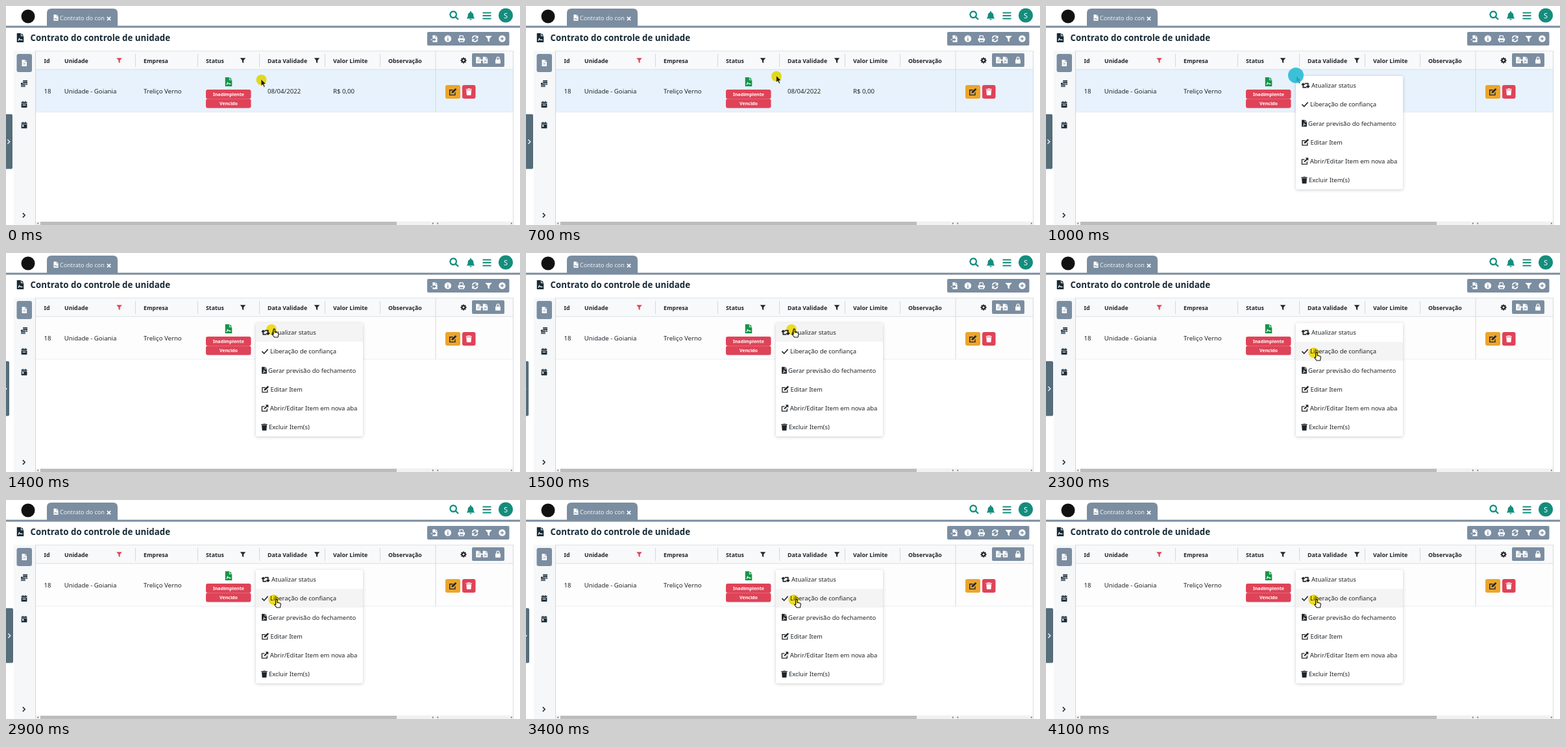
Animation, 792 px wide and 338 px high, one loop 4.2 s. Source, as an HTML page:

```html
<!DOCTYPE html>
<html lang="pt">
<head>
<meta charset="utf-8">
<style>
html, body { margin: 0; width: 100%; height: 100%; overflow: hidden; background: #fff; }
svg { display: block; }
text { font-family: "Noto Sans", "Open Sans", sans-serif; }
#menu { filter: drop-shadow(0 1px 2.5px #0003); }
#halo { mix-blend-mode: multiply; }
</style>
</head>
<body>
<svg id="stage" width="792" height="338" viewBox="0 0 792 338"></svg>
<script>
const SLATE = '#7b8da0', INK = '#202529', NAVY = '#172a36', TEAL = '#148d7d', RED = '#df4358';

// Icons on a 16 unit grid; a leading "~" means stroked
const FILE = 'M2 0h7v5h5v11H2zM10 0l4 4h-4z';
const ICONS = {
  file: FILE + 'M5 8h6v1H5zM5 11h6v1H5z',
  sign: FILE + 'M4 13l2-5 2 3 1-1 1 1h2v1.5H8.5l-1-1.5-1 .5-1 2z',
  pdf: FILE + 'M4 14l3-4-1-3h1.5l1 3 3.5 1v1l-4-.5-2.5 2.5z',
  load: 'M4 0h6v5h5v11H4v-4h4v2l4-4-4-4v2H4zM11 0l4 4h-4zM0 9h3v2H0z',
  info: 'M8 0a8 8 0 1 0 .01 0zM7 3h2v2H7zM6.5 7H9v4h1v1.5H6V11h1V8.5h-.5z',
  print: 'M3 0h8l2 2v4h-2V2H5v4H3zM0 7h16v6h-2v3H2v-3H0zM4 11v3h8v-3z',
  sync: '~M2 7a6 6 0 0 1 11-3M14 1v5H9M14 9a6 6 0 0 1-11 3M2 15v-5h5',
  filter: 'M0 1h16l-6 7v8l-4-3V8z',
  plus: 'M8 0a8 8 0 1 0 .01 0zM7 4h2v3h3v2H9v3H7V9H4V7h3z',
  coins: 'M5 0h11v3H5zM5 4h11v3H5zM0 6h4v2h7v2H0zM0 11h11v2H0zM0 14h11v2H0zM12 8h4v3h-4z',
  cal: 'M1 2h3V0h2v2h4V0h2v2h3v3H1zM1 6h14v10H1zM4 9v2h8V9z',
  calDay: 'M1 2h3V0h2v2h4V0h2v2h3v3H1zM1 6h14v10H1zM3 8v4h4V8z',
  edit: 'M0 3h9L7 5H2v9h10v-4l2-2v8H0zM14 0l2.5 2.5-8 8L5 11l.5-3.5z',
  trash: 'M1 1h4l1-1h4l1 1h4v2H1zM2 4h12l-1 12H3z',
  check: '~M1 8l5 5 9-10',
  swap: '~M3 4v8h7M0 7l3-3 3 3M13 12V4H6M10 9l3 3 3-3',
  open: 'M0 3h8L6 5H2v9h10v-4l2-2v8H0zM9 0h7v7l-2.5-2.5-6 6-2-2 6-6z',
  lock: 'M2 7h2V4a4 4 0 0 1 8 0v3h2v9H2zM6 7h4V4a2 2 0 0 0-4 0z',
  search: '~M6.5 1a5.5 5.5 0 1 0 .01 0zM10.5 10.5l5 5',
  bell: 'M7 0h2v2q4 1 4 6 0 3 2 5H1q2-2 2-5 0-5 4-6zM6 14h4q-2 3.5-4 0z',
  bars: '~M0 2.5h16M0 8h16M0 13.5h16',
  next: '~M5 2l6 6-6 6',
  close: '~M2 2l12 12M14 2L2 14',
  gear: 'M7 0h2l.5 2 1.5.7 2-1 1.3 1.3-1 2 .7 1.5 2 .5v2l-2 .5-.7 1.5 1 2-1.3 1.3-2-1-1.5.7-.5 2H7l-.5-2-1.5-.7-2 1L1.7 13l1-2L2 9.5 0 9V7l2-.5L2.7 5l-1-2L3 1.7l2 1L6.5 2zM8 5.5a2.5 2.5 0 1 0 .01 0z'
};

const icon = (name, cx, cy, size, color, weight = 2.4) => {
  const d = ICONS[name], k = size / 16;
  const paint = d[0] === '~'
    ? `fill="none" stroke="${color}" stroke-width="${weight}"`
    : `fill="${color}" fill-rule="evenodd"`;
  return `<path transform="translate(${cx - size / 2} ${cy - size / 2}) scale(${k})" d="${d.replace('~', '')}" ${paint}/>`;
};
const rect = (x, y, w, h, fill, r = 0) =>
  `<rect x="${x}" y="${y}" width="${w}" height="${h}" rx="${r}" fill="${fill}"/>`;
const label = (s, x, y, size, fill = INK, weight = 400, anchor = 'start') =>
  `<text x="${x}" y="${y}" font-size="${size}" fill="${fill}" font-weight="${weight}" text-anchor="${anchor}">${s}</text>`;

function topBar() {
  return rect(0, 30.5, 792, 3, SLATE) +
    '<circle cx="34" cy="16" r="10.5" fill="#111"/>' +
    `<path d="M63 32V11q0-7 7-7h95q7 0 7 7v21z" fill="${SLATE}"/>` +
    icon('sign', 77, 18, 9.5, '#fff') +
    `<svg x="83" y="8" width="69" height="20">${label('Contrato do controle', 0, 13.7, 9.1, '#eef1f4')}</svg>` +
    icon('close', 158.5, 19.5, 7, '#fff', 4) +
    icon('search', 690.5, 14.5, 14, TEAL, 2.6) + icon('bell', 716, 15, 14, TEAL) +
    icon('bars', 741, 15, 13, TEAL, 2.6) +
    `<circle cx="770" cy="14.5" r="11" fill="${TEAL}"/>` + label('S', 770, 18.5, 11, '#fff', 400, 'middle');
}

function titleBar() {
  const tools = ['load', 'info', 'print', 'sync', 'filter', 'plus'];
  return icon('sign', 22, 49, 14, NAVY) +
    label('Contrato do controle de unidade', 37.5, 53.7, 13.3, NAVY, 600) +
    rect(649, 40, 126.5, 21, SLATE, 2) +
    tools.map((n, i) => icon(n, 660 + i * 20.9, 50.5, 10.5, '#fff')).join('');
}

function sideBar() {
  return rect(12, 69, 33, 269, '#f6f7f9') + rect(45, 69, 1, 269, '#d3d6d9') +
    rect(16.5, 74, 23.5, 28, SLATE, 3) + icon('file', 28.3, 88, 10, '#fff') +
    ['coins', 'cal', 'calDay'].map((n, i) => icon(n, 28, 119.7 + i * 32, 10, NAVY)).join('') +
    icon('next', 27.5, 323, 9, INK, 2.6);
}

function table() {
  const heads = [['Id', 58.5], ['Unidade', 90], ['Empresa', 212], ['Status', 308],
    ['Data Validade', 403], ['Valor Limite', 504], ['Observação', 589]];
  const cells = [['18', 58.5], ['Unidade - Goiania', 89.7], ['Treliço Verno', 212], ['08/04/2022', 403], ['R$ 0,00', 504]];
  const badge = (s, y) => rect(308, y, 69.5, 14.2, RED, 3) + label(s, 343, y + 9.9, 7.1, '#fff', 700, 'middle');
  return rect(46, 69, 735, 29, '#f8f9fa') + rect(46, 69, 735, .8, '#d9dcdf') +
    '<rect id="row" x="46" y="98" width="735" height="66"/>' +
    rect(46, 97.5, 735, 1, '#dcdfe3') + rect(46, 163.5, 735, .8, '#e6e9ec') +
    [199, 295, 390, 491, 576].map(x => rect(x, 74, 1, 20, '#d5d8db')).join('') +
    rect(661.5, 69, 1, 95, '#d5d9de') + rect(781, 69, 1, 269, '#d9dcdf') +
    heads.map(([s, x]) => label(s, x, 87.5, 8.8, INK, 700)).join('') +
    icon('filter', 174.5, 84, 8.5, RED) + icon('filter', 365, 84, 8.5, INK) + icon('filter', 479, 84, 8.5, INK) +
    icon('gear', 705, 84, 9.5, INK) + rect(718, 73, 50, 21, SLATE, 2) +
    icon('file', 728, 83.5, 10, '#fff') + icon('pdf', 738.5, 83.5, 10, '#fff') +
    rect(731, 82.7, 5, 1.6, '#fff') + icon('lock', 758, 83.5, 10.5, '#fff') +
    cells.map(([s, x]) => label(s, x, 135.3, 9.62)).join('') +
    icon('sign', 343, 117, 14, '#169447') + badge('Inadimplente', 129) + badge('Vencido', 143.3) +
    rect(677, 122, 23, 21, '#eba52d', 3) + icon('edit', 688.5, 132.5, 11, INK) +
    rect(703, 122, 20.5, 21, RED, 3) + icon('trash', 713.2, 132.5, 10.5, '#fff') +
    rect(46, 332.5, 735, 5.5, '#f1f1f1') + rect(53, 333, 549, 5, '#bcbcbc') +
    '<path d="M50 334v3l-2-1.5zM657 334v3l2-1.5zM666 334v3l-2-1.5zM778 334v3l2-1.5z" fill="#666"/>';
}

function contextMenu() {
  const items = [['swap', 'Atualizar status', 409, 400, 12], ['check', 'Liberação de confiança', 407, 399, 10.5],
    ['pdf', 'Gerar previsão do fechamento', 404, 398, 10.5], ['edit', 'Editar Item', 407.5, 399.5, 10.5],
    ['open', 'Abrir/Editar Item em nova aba', 406.7, 399, 10.5], ['trash', 'Excluir Item(s)', 405, 398, 10.5]];
  return `<g id="menu">${rect(385, 108, 165, 175, '#fff', 3)}</g><g id="items">` +
    '<rect id="hover" x="385" width="165" height="29" fill="#f4f4f4"/>' +
    items.map(([n, s, x, cx, size], i) => {
      const y = 122.7 + i * 29.2;
      return icon(n, cx, y, size, INK, 2.4) + label(s, x, y + 3.4, 9.48);
    }).join('') + '</g>';
}

const POINTER = `<g id="pointer">
  <path id="arrow" d="M0 0v10.5l2.5-2.2 1.9 4.1 1.9-.9-1.8-3.9h3.4z" fill="#222" stroke="#fff" stroke-width=".7"/>
  <path id="hand" d="M2 7V1q1.2-1.8 2.4 0v4l4.4 1.3q1.4.6 1.1 2.2l-1 4.5H3.6L.4 9q-.5-1.5 1.6-.6z" fill="#fff" stroke="#111" stroke-width="1.1"/>
  </g><circle id="halo" r="8" fill="#f8e420"/>
  <circle id="click" cx="385" cy="107" r="12" fill="#24b8d3" opacity=".88"/>`;

const DRAWER = `<g id="drawer">${rect(-14, 167, 14, 84.5, '#566d7a', 2)}${icon('next', -6, 209.5, 9, '#fff', 2.4)}</g>`;

document.getElementById('stage').innerHTML =
  topBar() + titleBar() + sideBar() + table() + contextMenu() + POINTER + DRAWER;

const $ = Object.fromEntries(['row', 'menu', 'items', 'hover', 'pointer', 'halo', 'arrow', 'hand', 'click', 'drawer']
  .map(id => [id, document.getElementById(id)]));
const show = (el, on) => el.setAttribute('display', on ? 'inline' : 'none');
const move = (el, x, y) => el.setAttribute('transform', `translate(${x} ${y})`);

const LOOP = 4200, STEP = 100;
const PATH = [[0, 393, 113], [100, 393, 113], [500, 385.5, 107.5], [1100, 385.5, 107.5],
  [1400, 410, 117], [1800, 410, 117], [2200, 413.5, 153]];

function pointerAt(t) {
  const i = PATH.findIndex(p => p[0] > t);
  if (i < 0) return PATH[PATH.length - 1].slice(1);
  const [t0, x0, y0] = PATH[i - 1], [t1, x1, y1] = PATH[i];
  const u = (t - t0) / (t1 - t0), k = u * u * (3 - 2 * u);
  return [x0 + (x1 - x0) * k, y0 + (y1 - y0) * k];
}

function draw(now) {
  const t = Math.floor(now % LOOP / STEP) * STEP;
  const [x, y] = pointerAt(t);
  const open = t >= 900, inMenu = t >= 1200, clicking = t >= 800 && t < 1100;

  move($.pointer, x, y);
  move($.halo, x + (inMenu ? -1 : .5), y + 1);
  show($.halo, !clicking);
  show($.arrow, !inMenu);
  show($.hand, inMenu);
  show($.click, clicking);

  show($.menu, open);
  show($.items, open);
  show($.hover, inMenu);
  $.hover.setAttribute('y', y < 137 ? 108 : 137.2);
  $.row.setAttribute('fill', inMenu ? '#fdfdfe' : '#e7f2fd');

  // The drawer handle peeks out and slides back every two seconds, in whole pixels
  const s = Math.sin(t / 1000 * Math.PI);
  move($.drawer, Math.round(10.3 + s * (s > 0 ? 1 : 6)), 0);
}

function tick() {
  draw(performance.now());
  requestAnimationFrame(tick);
}
tick();
</script>
</body>
</html>
```
